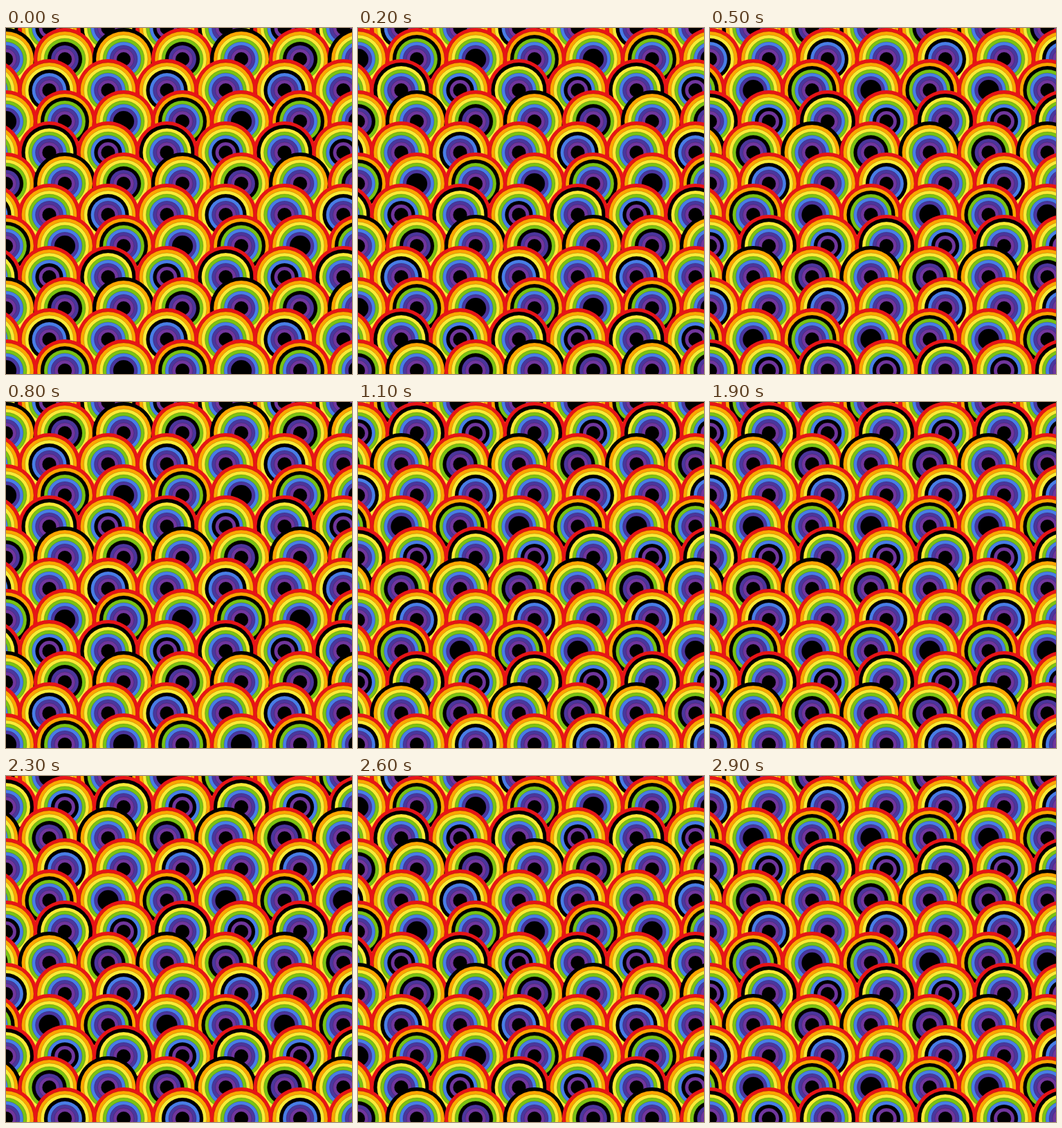
Recreate the animation shown at these times as an HTML page with a canvas. Size 500 by 500 pixels, loop 3 s.

```html
<!DOCTYPE html>
<html lang="en">
<head>
<meta charset="utf-8">
<title>Rainbow scales</title>
<style>
  html, body { margin: 0; width: 100%; height: 100%; overflow: hidden; background: #000; }
  canvas { display: block; width: 500px; height: 500px; }
</style>
</head>
<body>
<canvas id="stage" width="500" height="500"></canvas>
<script>
const ctx = document.getElementById('stage').getContext('2d');
const COLORS = ['#e81416', '#ffa500', '#faeb36', '#79c314', '#487de7', '#4b369d', '#70369d', '#000'];
const LOOP = 3000, STEP = 100;
const RADIUS = 45, RING = 5, GAP = 85;
const ROWS = 12, COLS = 7;

const mod = (n, m) => ((n % m) + m) % m;

// Concentric discs, with the one at index `dark` painted black.
function drawScale(x, y, dark) {
  COLORS.forEach((color, i) => {
    ctx.beginPath();
    ctx.arc(x, y, RADIUS - i * RING, 0, Math.PI * 2);
    ctx.fillStyle = i === dark ? '#000' : color;
    ctx.fill();
    if (i > 0) ctx.stroke();
  });
}

function draw(step) {
  ctx.fillStyle = '#000';
  ctx.fillRect(0, 0, 500, 500);
  ctx.lineWidth = 0.6;
  ctx.strokeStyle = 'rgba(0, 0, 0, 0.3)';
  for (let row = 0; row < ROWS; row++) {
    const shift = row % 2 ? 0 : RADIUS / 2;
    for (let col = 0; col < COLS; col++) {
      const dark = mod(1 - row + 4 * col - step, COLORS.length);
      drawScale(col * GAP - shift, row * RADIUS, dark);
    }
  }
}

const start = performance.now();
let shown = -1;

function tick() {
  const time = Math.max(0, performance.now() - start) % LOOP;
  const step = Math.floor(time / STEP);
  if (step !== shown) draw(shown = step);
  requestAnimationFrame(tick);
}
tick();
</script>
</body>
</html>
```
